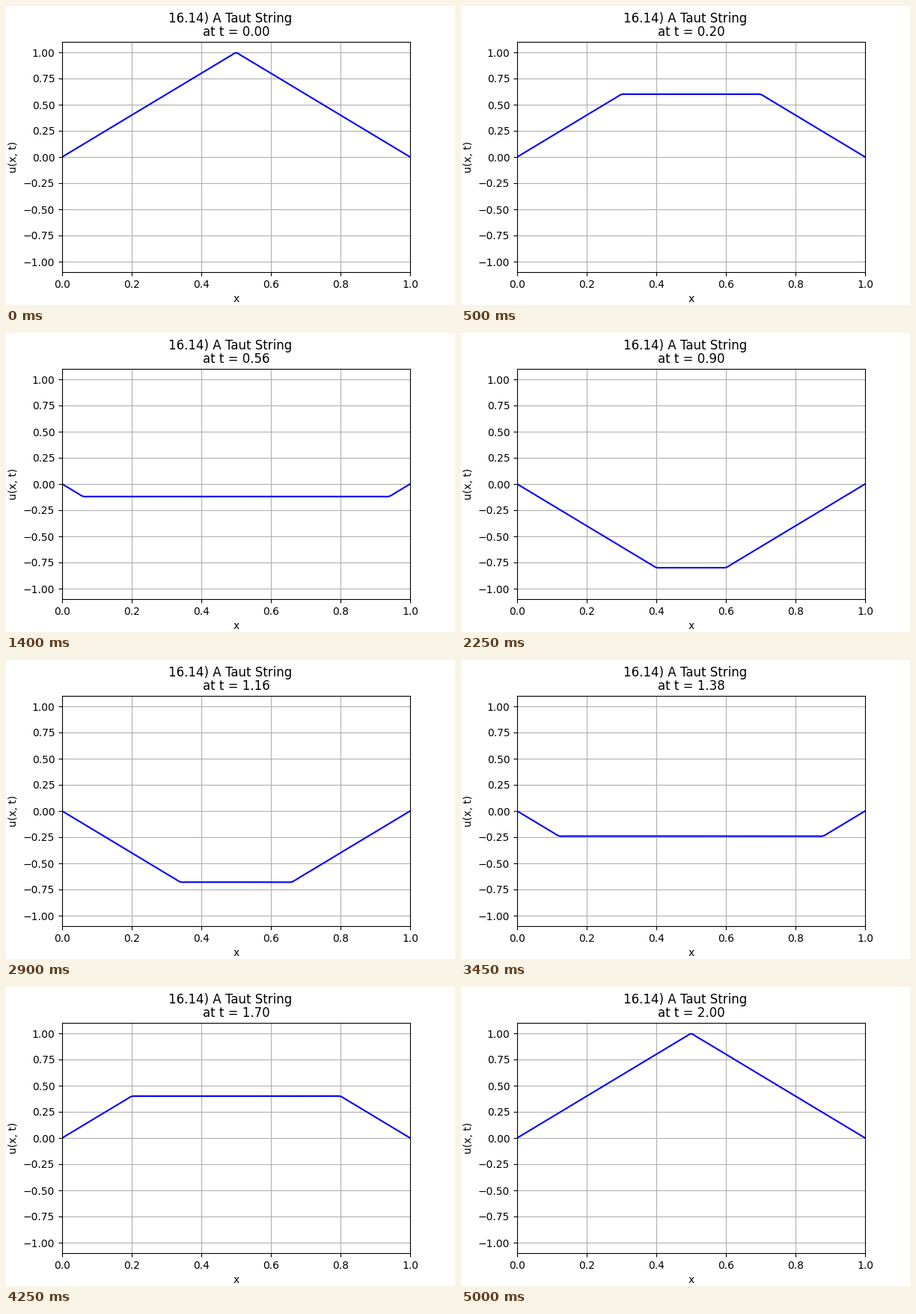
A matplotlib script that plays this animation: 600 by 400 pixels, repeating every 5.05 s.

```python
import numpy as np
import matplotlib.pyplot as plt
from matplotlib.animation import FuncAnimation

FRAMES = 101
DT = 0.02

x = np.linspace(0, 1, 201)
n = np.arange(1, 100, 2)
coef = 8 / np.pi**2 * np.sin(n * np.pi / 2) / n**2
modes = np.sin(np.pi * np.outer(x, n))


def displacement(t):
    """Plucked string with fixed ends, as a sum of standing waves."""
    return modes @ (coef * np.cos(n * np.pi * t))


fig, ax = plt.subplots(figsize=(6, 4), dpi=100)
fig.suptitle("16.14) A Taut String")
ax.set_xlim(0, 1)
ax.set_ylim(-1.1, 1.1)
ax.set_xlabel("x")
ax.set_ylabel("u(x, t)")
ax.grid(True)
line, = ax.plot(x, displacement(0), color="blue")
title = ax.set_title("at t = 0.00")


def update(i):
    t = i * DT
    line.set_ydata(displacement(t))
    title.set_text(f"at t = {t:.2f}")
    return line, title


anim = FuncAnimation(fig, update, frames=FRAMES, interval=50, repeat=True)
plt.show()
```
